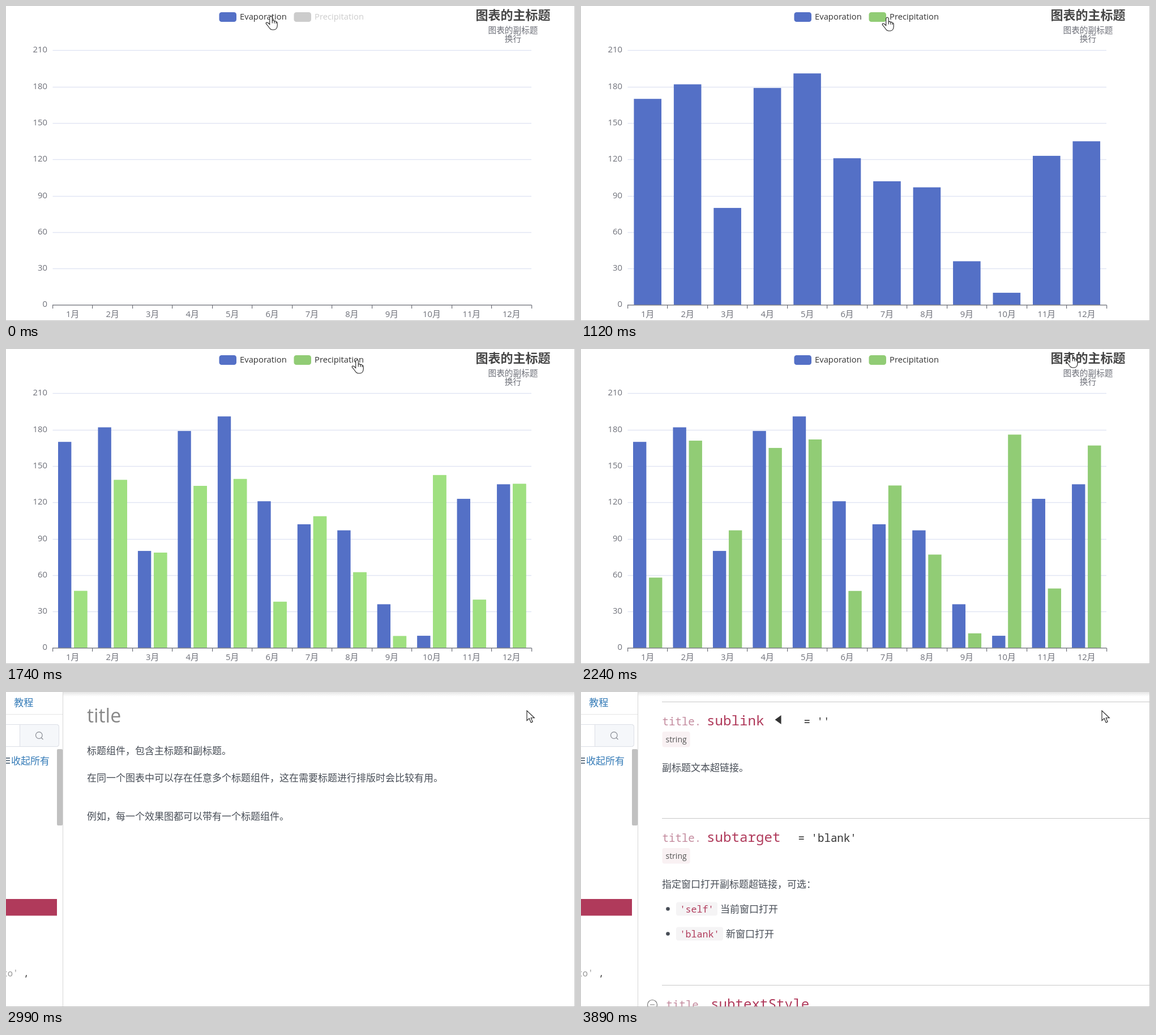
These frames come from a looping animation (1005x557 px, 4.02 s). An HTML page with a canvas:

```html
<!DOCTYPE html>
<html lang="zh-CN">
<head>
<meta charset="utf-8">
<style>
  html, body { margin: 0; width: 100%; height: 100%; overflow: hidden; background: #fff; }
  canvas { display: block; }
</style>
</head>
<body>
<canvas id="stage" width="1005" height="557"></canvas>
<script>
const ctx = document.getElementById('stage').getContext('2d');
const SANS = '"Open Sans", "Noto Sans CJK SC", "Noto Sans CJK", sans-serif';
const MONO = '"Noto Sans Mono", "DejaVu Sans Mono", monospace';
const LOOP = 4020, PAGE_OPENS = 2790;

// The picture advances in 100 ms ticks; each run is [first tick, last tick].
const RUNS = [[0, 1100], [1120, 1220], [1240, 2640], [2770, 2770], [2790, 3890]];
function tick(t) {
  const [first, last] = RUNS.filter(run => run[0] <= t).pop();
  return Math.min(last, first + Math.floor((t - first) / 100) * 100);
}

const clamp = v => Math.max(0, Math.min(1, v));
const progress = (t, start, length) => clamp((t - start) / length);
const cubicInOut = p => p < .5 ? 4 * p ** 3 : 1 - 4 * (1 - p) ** 3;
const cubicOut = p => 1 - (1 - p) ** 3;
const mix = (a, b, p) => a + (b - a) * p;

// Linear interpolation through keys [time, value, value...]
function along(keys, t) {
  const i = keys.findIndex(k => k[0] > t);
  if (i < 0) return keys[keys.length - 1].slice(1);
  if (i === 0) return keys[0].slice(1);
  const a = keys[i - 1], b = keys[i], p = (t - a[0]) / (b[0] - a[0]);
  return a.slice(1).map((v, j) => mix(v, b[j + 1], p));
}

function text(str, x, y, size, color, { align = 'left', family = SANS, weight = '' } = {}) {
  ctx.font = `${weight} ${size}px ${family}`;
  ctx.textAlign = align;
  ctx.fillStyle = color;
  ctx.fillText(str, x, y);
}
const code = (str, x, y, size, color) => text(str, x, y, size, color, { family: MONO });

function rect(x, y, w, h, color) {
  ctx.fillStyle = color;
  ctx.fillRect(x, y, w, h);
}

function roundRect(x, y, w, h, r, fill, stroke) {
  ctx.beginPath();
  ctx.roundRect(x, y, w, h, r);
  if (fill) { ctx.fillStyle = fill; ctx.fill(); }
  if (stroke) { ctx.strokeStyle = stroke; ctx.lineWidth = 1; ctx.stroke(); }
}

function strokePath(d, color, width) {
  ctx.strokeStyle = color;
  ctx.lineWidth = width;
  ctx.stroke(new Path2D(d));
}

// ---- Chart ----
const LEFT = 82.5, BASE = 528.5, BAND = 845.5 / 12, UNIT = 450 / 210;
const EVAPORATION = [170, 182, 80, 179, 191, 121, 102, 97, 36, 10, 123, 135];
const PRECIPITATION = [58, 171, 97, 165, 172, 47, 134, 77, 12, 176, 49, 167];
const FIRST_CLICK = 103, SECOND_CLICK = 1102;

function bars(values, x, width, growth, color, lifted, glow) {
  values.forEach((v, i) => {
    const h = v * UNIT * growth, left = LEFT + i * BAND + x;
    rect(left, BASE - h, width, h, color);
    ctx.globalAlpha = glow;
    rect(left, BASE - h, width, h, lifted);
    ctx.globalAlpha = 1;
  });
}

function legend(x, label, on, color) {
  roundRect(x, 11, 30.5, 17, 4.3, on ? color : '#ccc');
  text(label, x + 36.5, 23.5, 14.8, on ? '#333' : '#ccc');
}

function drawChart(t) {
  for (let v = 0; v <= 210; v += 30) {
    const y = Math.round(BASE - v * UNIT - .1);
    if (v) rect(LEFT, y - .2, 845.5, 1.4, '#e0e4f3');
    text(v, 73, y + 4, 14.8, '#6e7079', { align: 'right' });
  }

  const split = cubicInOut(progress(t, SECOND_CLICK, 500));
  const single = BAND * .69, pair = BAND * .73 / 2.2;
  bars(EVAPORATION, mix(BAND * .155, BAND * .135, split), mix(single, pair, split),
    cubicInOut(progress(t, FIRST_CLICK, 1000)),
    '#5470c6', '#5c7bd9', 1 - cubicOut(progress(t, 600, 300)));
  bars(PRECIPITATION, BAND * .135 + pair * 1.2, pair,
    cubicInOut(progress(t, SECOND_CLICK, 1000)),
    '#91cc75', '#9fe080', 1 - cubicOut(progress(t, 1800, 300)));

  rect(LEFT - .5, 528.2, 846.5, 1.3, '#6e7079');
  for (let i = 0; i <= 12; i++) {
    rect(Math.round(LEFT - .5 + i * BAND), 529, 1.2, 6, '#6e7079');
    if (i < 12) text(i + 1 + '月', LEFT + (i + .5) * BAND, 550, 14.8, '#6e7079', { align: 'center' });
  }

  legend(376.5, 'Evaporation', true, '#5470c6');
  legend(508.5, 'Precipitation', t >= SECOND_CLICK, '#91cc75');
  text('图表的主标题', 895.5, 23.5, 22, '#464646', { align: 'center', weight: 'bold' });
  text('图表的副标题', 895.5, 48, 14.67, '#6e7079', { align: 'center' });
  text('换行', 895.5, 63, 14.67, '#6e7079', { align: 'center' });
}

// ---- Documentation page ----
const ACCENT = '#b03a5b', BODY = '#474d56', LINK = '#337ab7', INTRO = -830;
const windows = ['self', 'blank'];
const SECTIONS = [
  { name: 'id', type: 'string',
    about: [[143, '组件 ID。默认不指定。指定则可用于在'], [442, 'option'], [496, '或者 API 中引用组件。']] },
  { name: 'show', value: 'true', type: 'boolean', about: '是否显示标题组件。' },
  { name: 'text', value: "''", type: 'string', about: '主标题文本，支持使用 \\n 换行。' },
  { name: 'link', value: "''", type: 'string', about: '主标题文本超链接。' },
  { name: 'target', value: "'blank'", type: 'string', about: '指定窗口打开主标题超链接，可选：', list: windows },
  { name: 'textStyle', type: 'Object', about: '', folds: true },
  { name: 'subtext', value: "''", type: 'string', about: '副标题文本，支持使用 \\n 换行。' },
  { name: 'sublink', value: "''", type: 'string', about: '副标题文本超链接。', marker: true },
  { name: 'subtarget', value: "'blank'", type: 'string', about: '指定窗口打开副标题超链接，可选：', list: windows },
  { name: 'subtextStyle', type: 'Object', about: '', folds: true }
];

function drawSection(s, y) {
  const indent = s.folds ? 7 : 0, nameX = 222 + indent;
  rect(143, y, 862, 1, '#c8c8c8');
  if (s.folds) strokePath(`M117.5 ${y + 35}a8.5 8.5 0 1 0 17 0a8.5 8.5 0 1 0 -17 0M122 ${y + 35}h8`, '#777', 1.2);
  code('title.', 143.5 + indent, y + 42, 19.1, '#c48c9f');
  code(s.name, nameX, y + 42, 24.2, ACCENT);
  let end = nameX + ctx.measureText(s.name).width;
  if (s.marker) {
    ctx.fillStyle = '#333';
    ctx.fill(new Path2D(`M${end + 19} ${y + 32}l11 -8v16z`));
    end += 39;
  }
  if (s.value) code('= ' + s.value, end + 31, y + 42, 19.1, '#333');

  ctx.font = `14px ${SANS}`;
  roundRect(143.5, y + 53, ctx.measureText(s.type).width + 12, 27.5, 4, '#f9f1f3');
  text(s.type, 149.5, y + 71.5, 14, '#555');
  const parts = Array.isArray(s.about) ? s.about : [[143, s.about]];
  parts.forEach(([x, str]) => text(str, x, y + 122.5, 17, BODY));

  (s.list || []).forEach((option, i) => {
    const mid = y + 160.5 + i * 44, quoted = `'${option}'`;
    const width = quoted.length * 10 + 13;
    ctx.fillStyle = BODY;
    ctx.beginPath();
    ctx.arc(153.5, mid, 3.3, 0, 7);
    ctx.fill();
    roundRect(168, mid - 12, width, 24, 4, '#f5f4f5');
    code(quoted, 174.5, mid + 6, 16.7, ACCENT);
    text(i ? '新窗口打开' : '当前窗口打开', 168 + width + 5, mid + 6, 17, BODY);
  });
}

function drawPage(t) {
  const [scroll] = along([[2990, INTRO], [3390, 0], [3890, 1652]], t);
  ctx.save();
  ctx.translate(0, -Math.round(scroll));
  text('title', 143, INTRO + 54, 34, '#888');
  text('标题组件，包含主标题和副标题。', 143, INTRO + 110, 17, BODY);
  text('在同一个图表中可以存在任意多个标题组件，这在需要标题进行排版时会比较有用。', 143, INTRO + 158, 17, BODY);
  text('例如，每一个效果图都可以带有一个标题组件。', 143, INTRO + 226, 17, BODY);
  text('所有属性', 143, 98, 34.2, '#8c8c8c');
  let y = 138;
  for (const section of SECTIONS) {
    drawSection(section, y);
    y += section.list ? 295 : 206;
  }
  ctx.restore();

  const shade = ctx.createLinearGradient(0, 0, 0, 8);
  shade.addColorStop(0, 'rgba(0,0,0,.1)');
  shade.addColorStop(1, 'rgba(0,0,0,0)');
  rect(101, 0, 904, 8, shade);
  drawSidebar();
}

function drawSidebar() {
  rect(100, 0, 1, 557, '#d6d6d6');
  rect(0, 39, 100, 1, '#e6e6e6');
  text('教程', 14, 24.5, 17.2, LINK);
  roundRect(-8.5, 57.5, 102, 39, 4, '#fff', '#dcdfe6');
  roundRect(24.5, 57.5, 69, 39, [0, 4, 4, 0], '#f5f7fa', '#dcdfe6');
  strokePath('M52.5 76.5a5.8 5.8 0 1 0 11.6 0a5.8 5.8 0 1 0 -11.6 0M62.5 81l3 3', '#8a8d94', 1.2);
  for (const y of [116, 120.5, 125]) rect(0, y, 7, 1.6, '#45586b');
  text('收起所有', 9, 127.5, 17, LINK);
  rect(0, 366, 90, 29.5, ACCENT);
  code("to'", -6.5, 503, 15.6, '#999');
  code(',', 31, 503, 15.6, '#333');
  roundRect(90, 101, 10, 135, 2, '#c1c1c1');
}

// ---- Pointer ----
const ARROW = new Path2D('M0 0V17.5L4.2 13.7L7.3 21L10.2 19.7L7.2 12.8H13.3Z');
const HAND = new Path2D('M-2.3 2Q0 -2 2.3 2V8Q5 6.3 6 9Q8.6 7.4 9.2 10Q11.2 9.6 11.2 12.5V17' +
  'Q10.5 23.6 5.5 24H2Q-1.5 23.5 -4 19L-8.8 13Q-8.8 10 -5.5 11.5L-2.3 14.5Z' +
  'M2.3 8V12.5M6 9V12.8M9.2 10V13');
const POINTER = [[0, 468, 18], [350, 468, 18], [600, 541, 20], [1140, 541, 20], [1740, 620, 19],
  [2340, 915, 7], [2640, 920, 41], [2770, 920, 41], [2890, 920, 33]];

function drawPointer(t) {
  const [x, y] = along(POINTER, t);
  const overLegend = x > 376 && x < 634;
  const overTitle = x > 830 && x < 961 && y < 28;
  const shape = t < PAGE_OPENS && (overLegend || overTitle) ? HAND : ARROW;
  ctx.save();
  ctx.translate(x, y);
  ctx.fillStyle = '#fff';
  ctx.fill(shape);
  ctx.strokeStyle = '#222';
  ctx.lineWidth = 1.1;
  ctx.stroke(shape);
  ctx.restore();
}

function draw(t) {
  rect(0, 0, 1005, 557, '#fff');
  (t < PAGE_OPENS ? drawChart : drawPage)(t);
  rect(0, 556, 1005, 1, '#bfbfbf');
  rect(1004, 0, 1, 557, '#c8c8c8');
  drawPointer(t);
}

const start = performance.now();
function loop() {
  draw(tick((performance.now() - start) % LOOP));
  requestAnimationFrame(loop);
}
loop();
</script>
</body>
</html>
```
